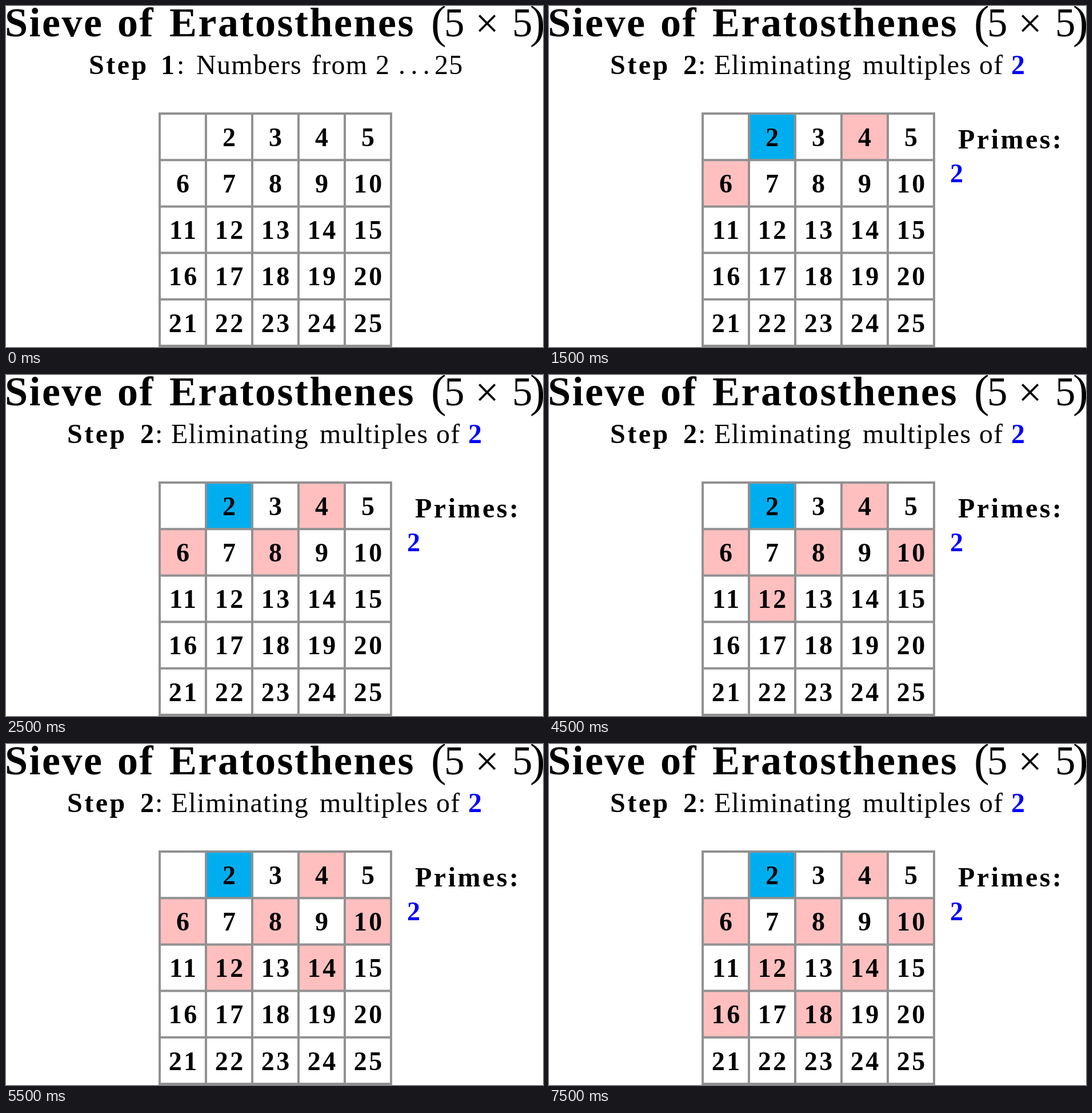
Recreate the animation shown at these times as an HTML page. Size 940 by 596 pixels, loop 8000 ms.

```html
<!DOCTYPE html>
<html lang="en">
<head>
<meta charset="utf-8">
<title>Sieve of Eratosthenes</title>
<style>
  html, body { margin: 0; width: 100%; height: 100%; overflow: hidden; background: #fff; }
  svg { display: block; width: 940px; height: 596px; }
  text { font-family: "Liberation Serif", "Times New Roman", serif; white-space: pre; }
  .title { font-size: 72px; font-weight: bold; letter-spacing: 2.5px; }
  .math { font-size: 71px; }
  .paren { font-size: 80px; }
  .times { font-size: 74px; }
  .bold { font-size: 48px; font-weight: bold; letter-spacing: 3.5px; }
  .plain { font-size: 48px; letter-spacing: 1.3px; }
  .dots { font-size: 48px; letter-spacing: 9.4px; }
  .num { font-size: 46px; font-weight: bold; letter-spacing: 3.5px; }
  .mid { text-anchor: middle; }
  .blue { fill: #00f; }
</style>
</head>
<body>
<svg id="stage" viewBox="0 0 940 596" xmlns="http://www.w3.org/2000/svg"></svg>
<script>
const LOOP = 8000, FIRST = 500, BEAT = 1000;
const LEFT = 269, TOP = 188, CELL_W = 81, CELL_H = 81.2, SIZE = 5;
const SPACING = 3.5;
const WHITE = '#fff', CYAN = '#00aeef', PINK = '#ffbfbf', GRAY = '#919191';

const stage = document.getElementById('stage');

function add(parent, tag, attrs, content = '') {
  const el = document.createElementNS('http://www.w3.org/2000/svg', tag);
  for (const key in attrs) el.setAttribute(key, attrs[key]);
  el.textContent = content;
  parent.appendChild(el);
  return el;
}

// Each word is [class, x, text], all on one baseline.
function line(parent, y, words) {
  for (const [cls, x, word] of words) add(parent, 'text', { class: cls, x, y }, word);
}

// Heading
line(stage, 52.5, [
  ['title', -2, 'Sieve'], ['title', 195, 'of'], ['title', 286, 'Eratosthenes'],
  ['math', 767, '5'], ['math', 886, '5']
]);
line(stage, 55, [['paren', 744, '('], ['times mid', 842, '×'], ['paren', 917, ')']]);

// Captions of the two steps
const intro = add(stage, 'g', {});
line(intro, 119, [
  ['bold', 145, 'Step'], ['bold', 271, '1'], ['plain', 299, ':'],
  ['plain', 333, 'Numbers'], ['plain', 535, 'from'], ['plain', 647, '2'],
  ['dots', 687, '...'], ['plain', 750, '25']
]);

const sieve = add(stage, 'g', {});
line(sieve, 119, [
  ['bold', 107, 'Step'], ['bold', 235, '2'], ['plain', 261, ':'],
  ['plain', 289, 'Eliminating'], ['plain', 549, 'multiples'], ['plain', 753, 'of'],
  ['bold blue', 809, '2']
]);
line(sieve, 249, [['bold', 716, 'Primes:']]);
line(sieve, 307.5, [['num blue', 702, '2']]);

// Grid: fills, then lines, then numbers
const cells = [];
for (let i = 0; i < SIZE * SIZE; i++) {
  const x = LEFT + (i % SIZE) * CELL_W, y = TOP + Math.floor(i / SIZE) * CELL_H;
  cells.push(add(stage, 'rect', { x, y, width: CELL_W, height: CELL_H, fill: WHITE }));
}

let rules = '';
for (let i = 0; i <= SIZE; i++) {
  const x = LEFT + i * CELL_W, y = TOP + i * CELL_H;
  rules += `M${x} ${TOP - 2}V${TOP + SIZE * CELL_H + 2}M${LEFT - 2} ${y}H${LEFT + SIZE * CELL_W + 2}`;
}
add(stage, 'path', { d: rules, stroke: GRAY, 'stroke-width': 4, fill: 'none' });

for (let n = 2; n <= SIZE * SIZE; n++) {
  const col = (n - 1) % SIZE, row = Math.floor((n - 1) / SIZE);
  const x = LEFT + (col + 0.5) * CELL_W + SPACING / 2;
  line(stage, TOP + row * CELL_H + 56.8, [['num mid', x, n]]);
}

function draw(t) {
  const step = t < FIRST ? 0 : Math.floor((t - FIRST) / BEAT) + 1;
  const last = 2 + 2 * step;
  intro.setAttribute('display', step ? 'none' : 'inline');
  sieve.setAttribute('display', step ? 'inline' : 'none');
  cells.forEach((cell, i) => {
    const n = i + 1;
    const struck = n > 2 && n % 2 === 0 && n <= last;
    cell.setAttribute('fill', step && n === 2 ? CYAN : struck ? PINK : WHITE);
  });
}

const start = performance.now();
function tick() {
  draw((performance.now() - start) % LOOP);
  requestAnimationFrame(tick);
}
tick();
</script>
</body>
</html>
```
